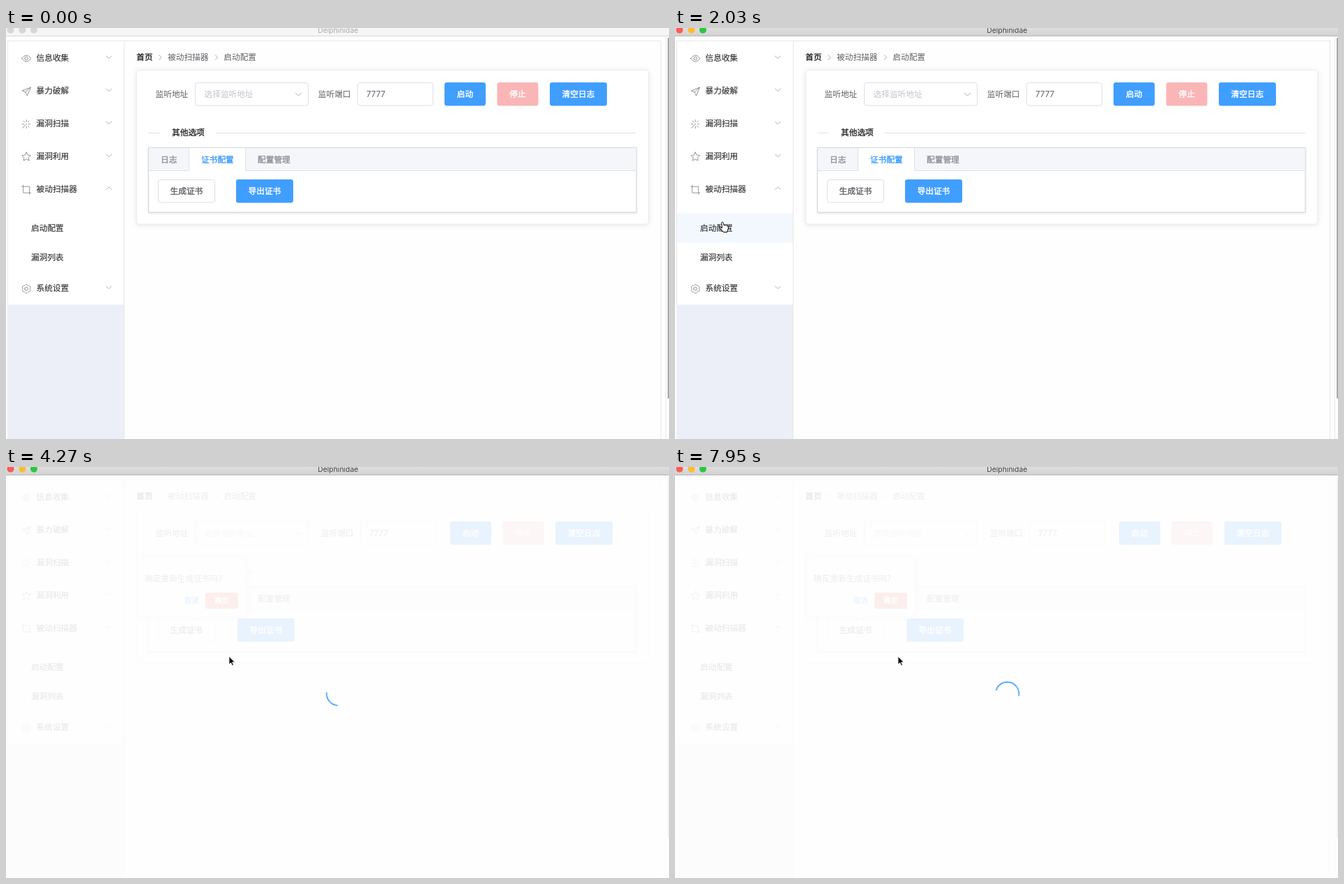
Write an HTML page that moves like this. It is 951 px wide and 589 px high and loops after 8 s.

```html
<!DOCTYPE html>
<html lang="zh-CN">
<head>
<meta charset="utf-8">
<title>Delphinidae</title>
<style>
html, body { margin: 0; width: 100%; height: 100%; overflow: hidden; background: #fefefe; }
svg { display: block; }
text { font: 11.7px "Noto Sans CJK SC", "Noto Sans CJK", sans-serif; fill: #606266; }
.latin { font-family: Inter, sans-serif; }
.small { font-size: 10px; }
.dark { fill: #303133; stroke: #303133; stroke-width: .15px; }
.medium { stroke: currentColor; fill: currentColor; stroke-width: .4px; }
.white { color: #fff; }
.muted { color: #909399; }
.bold { font-weight: 700; fill: #303133; }
.blue { fill: #409eff; }
.border { fill: #fff; stroke: #dcdfe6; }
.rule { fill: none; stroke: #dfe2ea; }
.frame { fill: none; stroke: #e8e8e8; }
.icon { fill: none; stroke: #85888d; stroke-width: .9px; stroke-linejoin: round; stroke-linecap: round; }
.chevron { fill: none; stroke: #a0a3a9; stroke-width: .9px; }
.card { fill: #fff; stroke: #ebeef5; filter: drop-shadow(0 1.7px 3.5px rgba(0,0,0,.1)); }
.panel { fill: #fff; stroke: #d5d8df; filter: drop-shadow(0 1.5px 1.5px rgba(0,0,0,.14)); }

#titlebar { fill: #f5f5f5; }
#edge { fill: #d9d9d9; }
#title { font-size: 10.4px; fill: #aaa; text-anchor: middle; }
#lights { fill: #d6d6d6; }
.active #titlebar { fill: url(#chrome); }
.active #edge { fill: #b8b8b8; }
.active #title { fill: #444; }
.active #lights :nth-child(1) { fill: #fc5b57; }
.active #lights :nth-child(2) { fill: #fdbc2e; }
.active #lights :nth-child(3) { fill: #27c840; }

#menuHover, #subHover { visibility: hidden; }
.menu-hover #menuHover, .sub-hover #subHover { visibility: visible; }
.export-hover #export { fill: #66b1ff; }
.make-hover #make rect { fill: #ecf5ff; stroke: #6bb3fb; }
#make { color: #606266; }
.make-hover #make { color: #409eff; }
.confirm-hover #confirm { fill: #f78989; }
.confirm-press #confirm { fill: #dd6161; }
#confirm { fill: #f56c6c; }
.loading .shift2 { transform: translateX(2px); }
.loading .shift4 { transform: translateX(4px); }
.loading .shift8 { transform: translateX(8px); }
.loading .drop { transform: translate(7px, 7px); }

#arrow { fill: #000; stroke: #fff; stroke-width: .8px; }
#hand { fill: #fff; stroke: #000; stroke-width: 1px; stroke-linejoin: round; }
#spinner {
  fill: none; stroke: #409eff; stroke-width: 2px; stroke-linecap: round;
  animation: turn 2s linear infinite paused, dash 1.5s ease-in-out infinite paused;
  animation-delay: calc(var(--clock, 0) * -1s);
}
@keyframes turn { to { transform: rotate(360deg); } }
@keyframes dash {
  0% { stroke-dasharray: 1, 200; stroke-dashoffset: 0; }
  50% { stroke-dasharray: 90, 150; stroke-dashoffset: -40px; }
  100% { stroke-dasharray: 90, 150; stroke-dashoffset: -120px; }
}
</style>
</head>
<body>
<svg id="stage" width="951" height="589" viewBox="0 0 951 589">
  <defs>
    <linearGradient id="chrome" x2="0" y2="1">
      <stop stop-color="#dedede"/><stop offset="1" stop-color="#d2d2d2"/>
    </linearGradient>
  </defs>
  <rect width="951" height="589" fill="#fefefe"/>

  <g id="page">
    <rect x="3" y="19" width="166" height="378" fill="#fff"/>
    <rect x="2" y="396.5" width="167" height="193" fill="#eceff8"/>
    <path class="frame" d="M2.5 397V18.5H939.5V589M169.5 19V589M946.5 12V589"/>
    <rect x="949" y="14" width="3" height="517" rx="1" fill="#a8a8a8"/>
    <rect id="menuHover" x="3" y="207" width="166" height="47" fill="#e9f4fe"/>
    <rect id="subHover" x="3" y="266" width="166" height="41.5" fill="#f2f8fe"/>
    <g id="menu"></g>
    <text class="dark" x="36" y="291.2">启动配置</text>
    <text class="dark" x="36" y="332.8">漏洞列表</text>

    <text class="bold" x="187" y="46.4">首页</text>
    <text x="232" y="46.4">被动扫描器</text>
    <text x="312.3" y="46.4">启动配置</text>
    <path class="chevron" d="M219.5 38.5l3.5 3.7-3.5 3.7M300 38.5l3.5 3.7-3.5 3.7"/>

    <rect class="card" x="187.5" y="60.5" width="734" height="220.5" rx="3.5"/>
    <text x="214.5" y="99.2">监听地址</text>
    <rect class="border" x="271.5" y="78.5" width="162" height="32.5" rx="3.3"/>
    <text x="284.5" y="99.2" style="fill:#c0c4cc">选择监听地址</text>
    <path class="chevron" d="M415.3 93l4.2 4.2 4.2-4.2"/>
    <g class="shift4">
      <text x="447.8" y="99.2">监听端口</text>
      <rect class="border" x="504.5" y="78.5" width="108" height="32.5" rx="3.3"/>
      <text class="latin" x="517" y="99">7777</text>
    </g>
    <g class="shift8">
      <rect class="blue" x="629" y="78" width="59" height="33.5" rx="3.3"/>
      <rect x="704.5" y="78" width="59" height="33.5" rx="3.3" fill="#fab6b6"/>
      <rect class="blue" x="780" y="78" width="82" height="33.5" rx="3.3"/>
      <text class="medium white" x="646.7" y="99.2">启动</text>
      <text class="medium white" x="722.3" y="99.2">停止</text>
      <text class="medium white" x="797.6" y="99.2">清空日志</text>
    </g>

    <path class="rule" d="M204 150.5H221M301 150.5H904"/>
    <text class="medium" color="#303133" x="238" y="154.4">其他选项</text>

    <rect class="panel" x="204.5" y="171.5" width="699.5" height="92.5"/>
    <rect x="205" y="172" width="698.5" height="32.5" fill="#f5f6fa"/>
    <rect x="263" y="172" width="81" height="33" fill="#fff"/>
    <path class="rule" d="M205 204.5H262.5V172M343.5 172V204.5H903.5"/>
    <text class="medium muted" x="222" y="193">日志</text>
    <text class="medium" color="#409eff" x="280" y="193">证书配置</text>
    <text class="medium muted" x="361" y="193">配置管理</text>
    <g id="make">
      <rect class="border" x="218.5" y="217.5" width="81" height="32.5" rx="3.3"/>
      <text class="medium" x="235.5" y="238.2">生成证书</text>
    </g>
    <g class="shift2">
      <rect id="export" class="blue" x="330" y="217" width="82" height="33.5" rx="3.3"/>
      <text class="medium white" x="347.5" y="238.2">导出证书</text>
    </g>

    <g id="popup"><g class="drop">
      <rect class="card" x="181.5" y="123.5" width="155.5" height="83.5" rx="3.3"/>
      <path d="M254 206.5l5 5 5-5z" fill="#fff"/>
      <text x="192" y="156.9">确定重新生成证书吗?</text>
      <text class="small medium" color="#409eff" x="249.5" y="187.8" stroke-width=".2">取消</text>
      <rect id="confirm" x="279" y="173" width="47" height="23" rx="2.5"/>
      <text class="small medium white" x="292.5" y="187.8">确定</text>
    </g></g>
  </g>

  <g id="loader" transform="translate(476.6 325) scale(.84)"><circle id="spinner" r="20"/></g>

  <rect id="titlebar" width="951" height="11"/>
  <rect id="edge" y="11" width="951" height="1"/>
  <g id="lights"><circle cx="6.5" cy="2.7" r="5"/><circle cx="23.5" cy="2.7" r="5"/><circle cx="40" cy="2.7" r="5"/></g>
  <text id="title" class="latin" x="476.3" y="6.7">Delphinidae</text>

  <g id="cursor">
    <path id="arrow" d="M0 0V11.5L2.7 9 4.4 13 6.3 12.2 4.6 8.3H8.2Z"/>
    <path id="hand" d="M-1.2 1.3Q-1-.4.6.2 1.2.6 1.5 1.6L2.3 5 3 4.4Q4.3 4 4.7 5 6 4.4 6.6 5.6 8.2 5.2 8.4 7L8.3 10 7 12.5V14.5H1.2L.6 13-3 9.6Q-4.8 8-3.8 7.2-2.8 6.8-.5 8.8Z"/>
  </g>
</svg>
<script>
const LOOP = 8000;
const $ = id => document.getElementById(id);

const starPath = Array.from({ length: 10 }, (_, i) => {
  const r = i % 2 ? 3.3 : 6.6, a = (i / 5 - .5) * Math.PI;
  return `${(r * Math.cos(a)).toFixed(2)} ${(r * Math.sin(a)).toFixed(2)}`;
}).join('L');
const gearPath = Array.from({ length: 48 }, (_, i) => {
  const a = i / 24 * Math.PI, r = 5.8 + .6 * Math.cos(6 * a);
  return `${(r * Math.sin(a)).toFixed(2)} ${(r * Math.cos(a)).toFixed(2)}`;
}).join('L');

// label, row centre, icon path around 0,0
const rows = [
  ['信息收集', 43, 'M-6.7 0Q0-9.4 6.7 0 0 9.4-6.7 0ZM-2.3 0a2.3 2.3 0 1 0 4.6 0a2.3 2.3 0 1 0-4.6 0'],
  ['暴力破解', 90, 'M6-5.5L-6-.8-1.2 1 1 6ZM-1.2 1L6-5.5'],
  ['漏洞扫描', 137, 'M-5.5 5.5L.5-.5M0-6V-3.5M5.5 0H3M4-4.5L2.4-2.9M-4-4.5L-2.4-2.9M4 4.5L2.4 2.9M-6 0H-3.5M0 6V3.5'],
  ['漏洞利用', 184, `M${starPath}Z`],
  ['被动扫描器', 231, 'M-6.5-4.5H4.5V6.5M-4.5-6.5V4.5H6.5'],
  ['系统设置', 373, `M${gearPath}ZM-2.4 0a2.4 2.4 0 1 0 4.8 0a2.4 2.4 0 1 0-4.8 0`],
];
$('menu').innerHTML = rows.map(([label, y, icon], i) => {
  const bend = i === 4 ? -2 : 2;
  return `<path class="icon" transform="translate(29.2 ${y + .7})" d="${icon}"/>
    <text class="dark" x="43.5" y="${y + 4.2}">${label}</text>
    <path class="chevron" d="M143.5 ${y - 1.2 - bend}l4 ${2 * bend} 4 ${-2 * bend}"/>`;
}).join('');

// class name, start, end
const states = [
  ['active', 280, LOOP],
  ['export-hover', 410, 1440],
  ['menu-hover', 1150, 1440],
  ['sub-hover', 1440, 3210],
  ['make-hover', 2760, 3360],
  ['confirm-hover', 3800, 3940],
  ['confirm-press', 3940, 4090],
  ['loading', 4090, LOOP],
];

// start, x, y, pointing hand
const moves = [
  [700, 118, 570, 0], [850, 106, 470, 0], [1000, 88, 345, 1], [1150, 76, 240, 1],
  [1290, 69, 268.5, 1], [1440, 68, 274, 1], [1590, 67, 277, 1], [1730, 66, 278, 1],
  [2030, 68, 278, 1], [2180, 78, 277, 1], [2320, 102, 270, 1], [2470, 140, 260, 0],
  [2620, 184, 250, 0], [2760, 224, 242, 1], [2910, 248, 238, 1], [3060, 258.5, 235.5, 1],
  [3360, 262, 230, 1], [3500, 270, 214, 0], [3650, 281, 198, 0], [3800, 290, 184, 0],
  [3940, 292.5, 181.5, 0], [4090, 301, 208, 0], [4270, 320, 271.5, 0],
];

const show = (id, on) => $(id).setAttribute('visibility', on ? 'visible' : 'hidden');

function render(t) {
  for (const [name, from, to] of states) $('stage').classList.toggle(name, t >= from && t < to);

  $('popup').setAttribute('opacity', t < 3210 ? 0 : t < 3360 ? .5 : 1);
  $('page').setAttribute('opacity', t < 4090 ? 1 : t < 4270 ? .6 : .1);

  const move = moves.findLast(m => t >= m[0]);
  show('arrow', move && !move[3]);
  show('hand', move && move[3]);
  if (move) $('cursor').setAttribute('transform', `translate(${move[1]} ${move[2]})`);

  show('loader', t >= 4090);
  const tick = Math.floor((t - 4258) / 147.2);
  $('spinner').style.setProperty('--clock', tick < 0 ? .122 : .305 + tick * .1497);
}

const start = performance.now();
(function loop() {
  render((performance.now() - start) % LOOP);
  requestAnimationFrame(loop);
})();
</script>
</body>
</html>
```
